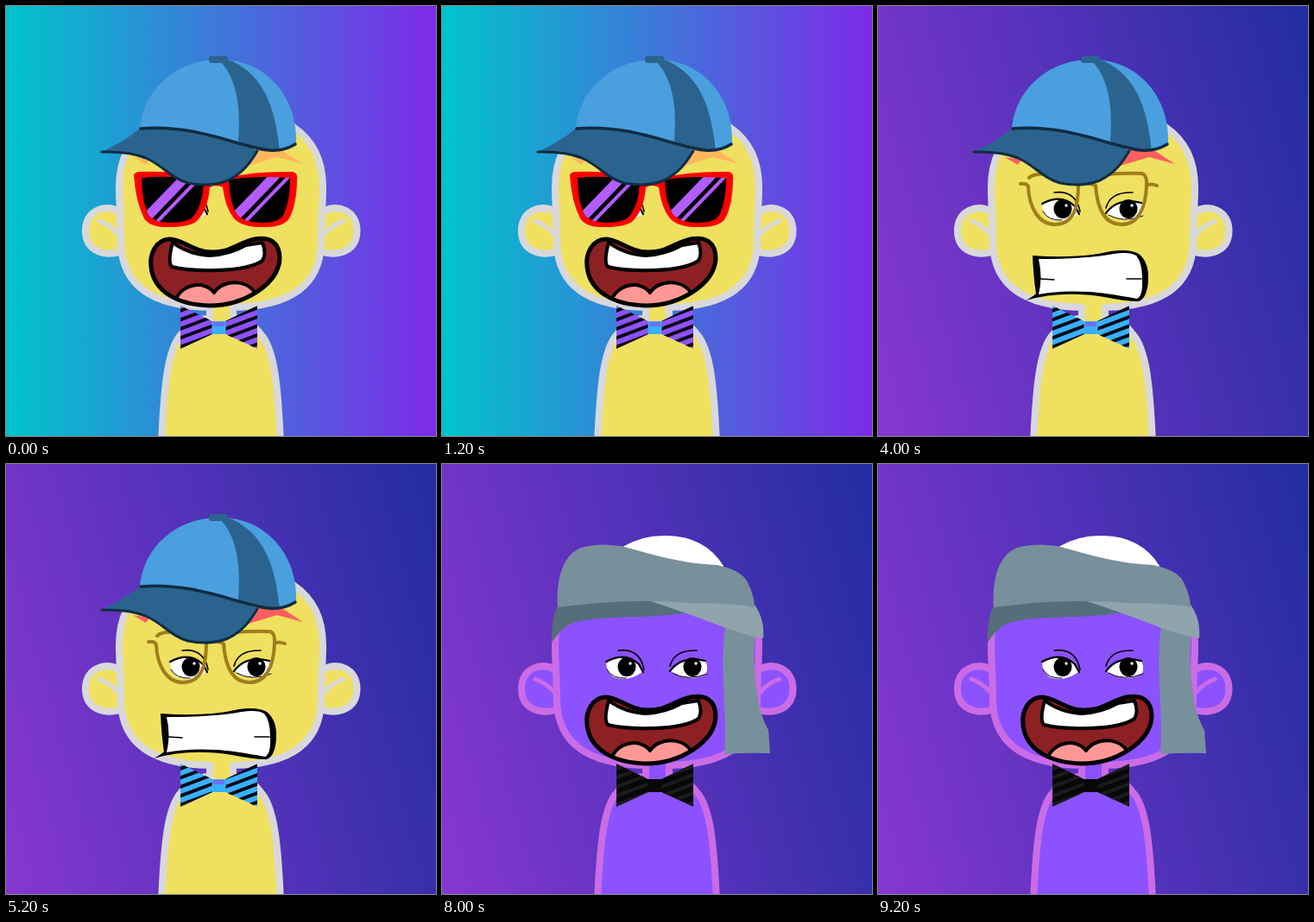
Animation of 498x498 px, one loop 10000 ms. Source, as an HTML page:

```html
<!DOCTYPE html>
<html lang="en">
<head>
<meta charset="utf-8">
<title>Avatar shuffle</title>
<style>
  html, body { margin: 0; width: 100%; height: 100%; overflow: hidden; }
  #stage { width: 100vw; height: 100vh; }
  svg { display: block; width: 100%; height: 100%; }
</style>
</head>
<body>
<div id="stage"><svg id="art" viewBox="0 0 498 498" stroke-linecap="round" stroke-linejoin="round"></svg></div>
<script>
const HOLD = 2000;
const CYAN = 'linear-gradient(90deg, #00c4cc, #7d2ae8)';
const NIGHT = 'linear-gradient(75deg, #8737d1, #222da2)';
const YELLOW = { skin: '#efe060', edge: '#d8d8dc' };
const PURPLE = { skin: '#8c52ff', edge: '#cb6ce6' };
const PLUM_BOW = { wing: '#8c52ff', knot: '#38b0ff', fold: '#6c70ff', stripe: '#0a0612' };
const SKY_BOW = { wing: '#38b0ff', knot: '#38b0ff', fold: '#6c70ff', stripe: '#0a0612' };
const PEACH_BOW = { wing: '#ff9a82', knot: '#ff9a82', fold: '#ff9a82', stripe: '#0a0612' };
const BLACK_BOW = { wing: '#080808', knot: '#080808', fold: '#080808', stripe: '#1c1c1c' };

const fill = (d, color, extra = '') => `<path d="${d}" fill="${color}" ${extra}/>`;
const line = (d, color, width, extra = '') =>
  `<path d="${d}" fill="none" stroke="${color}" stroke-width="${width}" ${extra}/>`;
const shape = (d, color, edge, width) =>
  fill(d, color, `stroke="${edge}" stroke-width="${width}"`);
const clip = (id, d, content) =>
  `<clipPath id="${id}"><path d="${d}"/></clipPath><g clip-path="url(#${id})">${content}</g>`;
const flip = content => `<g transform="translate(498.5 0) scale(-1 1)">${content}</g>`;

function body({ skin, edge }) {
  const ear = shape('M133 239C114 228 92 237 92 260C92 284 114 291 135 284', skin, edge, 8)
    + line('M108 249Q121 254 130 264', edge, 5);
  const figure = 'M180 506C183 440 187 397 203 380C212 368 221 362 236 362V349'
    + 'C185 348 135 334 133 275C133 245 131 230 131 210C131 180 141 157 164 141'
    + 'C188 120 218 112 249 112C280 112 310 120 334 141C357 157 367 180 367 210'
    + 'C367 230 365 245 365 275C363 334 313 348 263 349V362'
    + 'C277 362 286 368 295 380C311 397 315 440 318 506Z';
  return ear + flip(ear) + shape(figure, skin, edge, 8);
}

function eyes() {
  const ball = x => `<ellipse cx="${x}" cy="235" rx="10.5" ry="11"/><circle cx="${x + 4}" cy="231" r="1.7" fill="#fff"/>`;
  return fill('M190 229Q211 219 227 231L232 241Q215 253 199 247Q190 241 190 229Z', '#fff')
    + fill('M264 240Q276 222 304 227Q309 233 306 243Q286 254 264 240Z', '#fff')
    + ball(214) + ball(290)
    + line('M190 229Q213 217 228 232L233 241', '#000', 2.2)
    + line('M264 240Q278 221 305 228', '#000', 2.2)
    + line('M191 238Q197 249 213 248M267 242Q284 252 307 243', '#000', 1)
    + line('M204 216Q229 213 234 238M264 234Q269 215 295 216', '#000', 1.6);
}

const brows = {
  sharp: c => fill('M147 175L166 178L162 184Z', c)
    + fill('M274 187L290 165L318 166L344 183L314 175Z', c),
  soft: c => fill('M186 177Q218 172 230 183Q231 190 223 191Q208 181 186 177Z', c)
    + fill('M263 192Q261 183 270 178Q286 171 306 178Q284 181 271 191Z', c)
};

const mouths = {
  laugh() {
    const outer = 'M190 270C174 270 166 287 168 302C171 331 199 346 236 347'
      + 'C276 347 315 322 317 293C317 273 305 267 288 270C267 275 259 286 238 285C218 285 204 270 190 270Z';
    return fill(outer, '#8d2022')
      + clip('lips', outer,
        shape('M193 274Q212 288 236 289Q258 288 278 277L297 274Q302 287 297 295'
          + 'Q282 305 245 306Q210 307 192 302Q187 296 193 274Z', '#fff', '#000', 4)
        + shape('M195 344C202 321 230 317 241 332C250 317 280 315 290 335L270 350H210Z', '#ff9895', '#000', 4))
      + line(outer, '#000', 5);
  },
  grit() {
    return fill('M179 289Q232 293 270 284Q291 281 302 287Q314 297 313 317Q312 338 302 342'
      + 'Q286 342 262 337Q213 329 171 341Q179 337 183 333Q180 314 179 289Z', '#000')
      + fill('M186 293Q240 293 273 287Q291 284 299 289Q306 297 306 316Q307 336 300 339'
      + 'Q262 332 244 331Q211 329 186 334Q191 314 186 293Z', '#fff')
      + line('M188 316L204 317M288 316L305 316', '#000', 1.5);
  },
  smile() {
    return line('M178 297C193 323 284 323 303 295M168 308L188 286M293 285L314 307', '#000', 6);
  }
};

const glasses = {
  shades() {
    const left = 'M157 199Q191 195 229 202Q229 231 215 246Q207 251 190 251Q173 251 166 243Q157 228 157 199Z';
    const right = 'M258 202Q275 196 329 199Q330 222 322 241Q317 251 299 251Q279 252 269 243Q259 231 258 202Z';
    const shine = (x, id, d) => clip(id, d, fill(d, '#000')
      + line(`M${x} 252L${x + 56} 194`, '#b35cff', 11, 'stroke-linecap="butt"')
      + line(`M${x + 17} 252L${x + 73} 194`, '#b35cff', 4, 'stroke-linecap="butt"'));
    const rim = 'M148 196Q149 192 155 192Q194 190 232 200Q243 204 256 199Q287 191 332 192'
      + 'Q338 193 337 200Q337 229 328 246Q322 256 300 256Q274 257 264 246Q254 234 251 210'
      + 'Q243 206 236 210Q234 236 221 249Q213 256 190 256Q167 257 160 246Q150 226 148 196Z';
    return fill(rim, '#f00') + shine(156, 'lensL', left) + shine(258, 'lensR', right);
  },
  wire() {
    return line('M165 206Q172 205 174 209C175 235 187 253 205 253C226 253 232 234 232 207'
      + 'M175 199Q181 193 202 195M232 207Q242 203 252 208'
      + 'M252 208C254 236 263 253 282 253C301 253 310 235 311 208Q315 205 323 208'
      + 'M257 197Q269 193 306 194Q312 196 311 208', '#a07d1b', 4);
  },
  visor() {
    const lens = 'M147 204L240 197L340 200L334 241L290 260Q278 262 271 252L260 233'
      + 'Q247 221 235 233L220 254Q214 262 204 260L161 244Q151 230 147 204Z';
    const facets = [
      ['M140 195H350V265H140Z', '#dd304f'],
      ['M140 195H153L171 250H140Z', '#f6dd24'],
      ['M153 200H161L180 254L168 249Z', '#f16a3b'],
      ['M181 195H314L284 265H211Z', '#8b3768'],
      ['M199 195H296L270 265H224Z', '#512753'],
      ['M324 200H350V260H313Z', '#f6dd24'],
      ['M318 200H325L315 255H305Z', '#f16a3b']
    ];
    return clip('visor', lens, facets.map(([d, c]) => fill(d, c)).join('')
        + line('M179 219L181 240M316 215V235', '#efa1b0', 1.5))
      + line('M221 254L235 233Q247 221 260 233L272 254', '#15151a', 4)
      + fill('M139 198Q146 194 165 192H292L338 194V206L284 203Q272 211 258 214H236'
        + 'Q222 211 210 203L168 203L154 209L151 221L143 217Q138 205 139 198Z', '#15151a')
      + line('M171 198H204M229 200H266M290 199H321', '#44434a', 2);
  }
};

const hats = {
  cap() {
    const navy = '#102c43', dark = '#2a648e';
    return fill('M155 142C159 99 194 62 248 62C302 62 339 107 336 160Q318 174 286 163Q218 139 155 142Z', '#4a9fdf')
      + fill('M247 63Q256 61 262 64C300 82 312 119 317 168Q294 168 269 157C273 109 264 80 247 63Z', dark)
      + `<rect x="235" y="58" width="22" height="8" rx="3" fill="${dark}"/>`
      + fill('M110 169Q134 159 155 142C208 139 242 153 292 167C283 181 275 193 257 202'
        + 'Q237 210 211 205C192 200 182 185 162 176Q141 168 110 169Z', dark)
      + line('M156 142C211 137 256 157 289 164Q316 172 335 160', navy, 3.5)
      + line('M111 169Q143 168 162 176C182 185 192 200 211 205Q237 210 257 202C275 193 283 181 291 168', navy, 3);
  },
  turban() {
    return fill('M209 96Q232 82 261 83Q305 84 326 118V135L209 115Z', '#fff')
      + fill('M328 188L363 196C359 224 363 259 368 284Q373 300 378 308L380 335Q354 334 327 336C331 289 321 239 328 188Z', '#78909c')
      + fill('M134 163Q190 150 240 157L284 172C230 181 174 173 145 187Q135 194 127 207Q126 181 134 163Z', '#546e7a')
      + fill('M236 157Q305 151 362 163Q374 180 372 202Q354 199 329 190Q285 173 236 157Z', '#90a4ae')
      + fill('M134 166C132 133 140 105 161 97Q180 91 208 95C251 107 278 115 319 117Q347 123 354 137Q362 153 362 166'
        + 'Q338 161 287 161C232 156 179 160 134 166Z', '#78909c');
  }
};

function bowTie({ wing, knot, fold, stripe }) {
  const wings = 'M202 347L239 365V380L202 397ZM291 347L254 365V380L291 397Z';
  let stripes = '';
  for (let y = 325; y < 430; y += 10.5) {
    stripes += line(`M202 ${y + 7}L239 ${y - 7}M254 ${y + 7}L291 ${y - 7}`, stripe, 4);
  }
  return clip('bow', wings, fill(wings, wing) + stripes)
    + `<rect x="238.5" y="365" width="16" height="15" rx="1" fill="${knot}"/>`
    + `<rect x="240" y="366" width="13" height="5" fill="${fold}"/>`;
}

const scenes = [
  { bg: CYAN, tone: YELLOW, hat: 'cap', brow: ['sharp', '#ffb65c'], specs: 'shades', mouth: 'laugh', bow: PLUM_BOW },
  { bg: NIGHT, tone: YELLOW, hat: 'cap', brow: ['sharp', '#000'], specs: 'wire', mouth: 'grit', bow: PLUM_BOW },
  { bg: NIGHT, tone: YELLOW, hat: 'cap', brow: ['sharp', '#ff5f5f'], specs: 'wire', mouth: 'grit', bow: SKY_BOW },
  { bg: NIGHT, tone: PURPLE, hat: 'turban', brow: ['soft', '#ffb43f'], specs: 'visor', mouth: 'smile', bow: PEACH_BOW },
  { bg: NIGHT, tone: PURPLE, hat: 'turban', mouth: 'laugh', bow: BLACK_BOW }
];

const stage = document.getElementById('stage');
const art = document.getElementById('art');
let shown = -1;

function draw({ bg, tone, hat, brow, specs, mouth, bow }) {
  stage.style.background = bg;
  art.innerHTML = body(tone) + eyes()
    + (brow ? brows[brow[0]](brow[1]) : '')
    + mouths[mouth]()
    + (specs ? glasses[specs]() : '')
    + hats[hat]() + bowTie(bow);
}

function tick() {
  const index = Math.floor(performance.now() / HOLD) % scenes.length;
  if (index !== shown) draw(scenes[shown = index]);
  requestAnimationFrame(tick);
}
tick();
</script>
</body>
</html>
```
